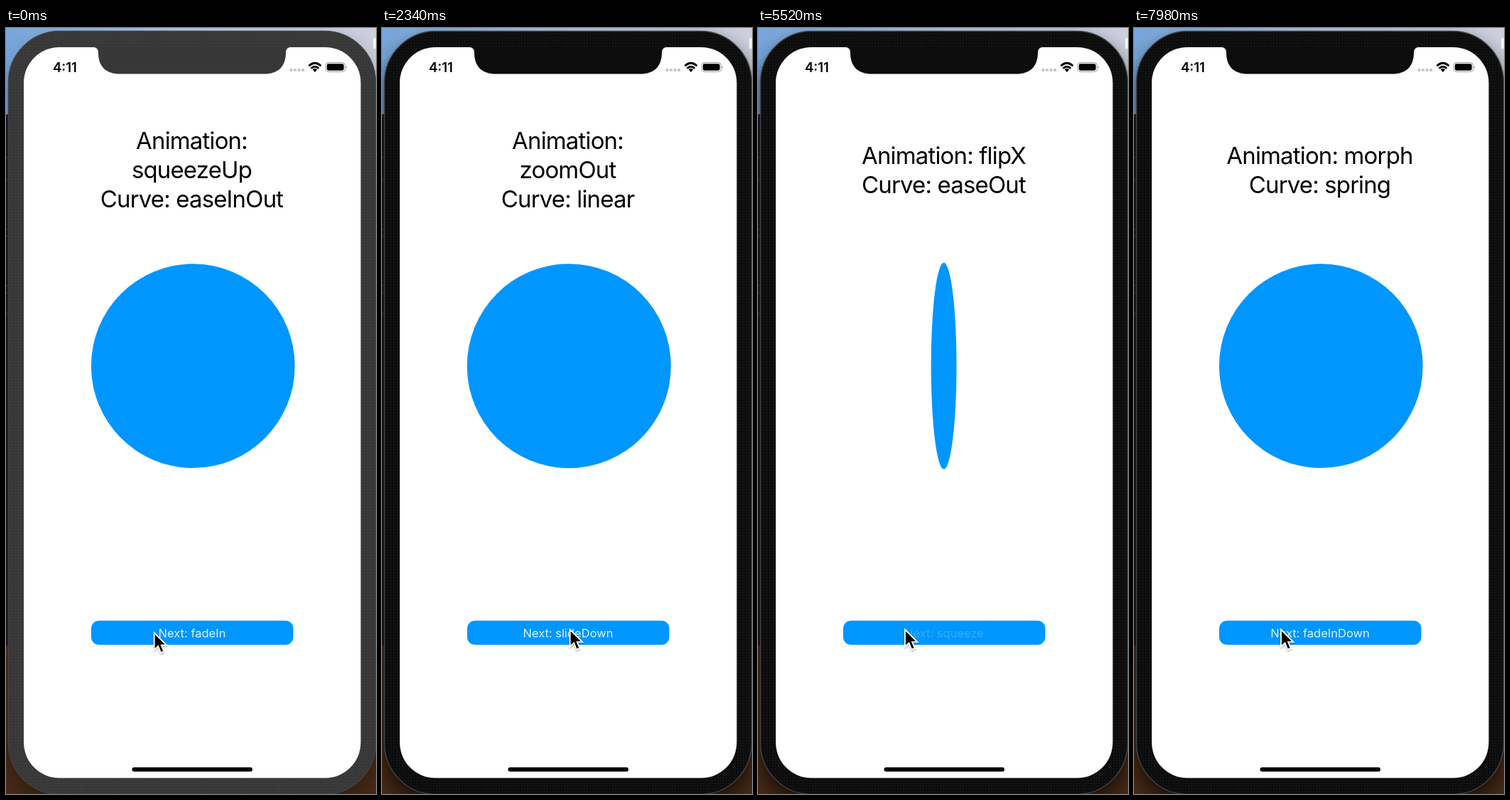
Animation of 521x1076 px, one loop 8 s. Source, as an HTML page:

```html
<!DOCTYPE html>
<html lang="en">
<head>
<meta charset="utf-8">
<title>Animation demo</title>
<style>
  html, body { margin: 0; width: 100%; height: 100%; overflow: hidden; background: #111; }
  svg { display: block; width: 521px; height: 1076px; }
  text { font-family: Inter, Roboto, sans-serif; font-optical-sizing: none; }
  #title { font-size: 33px; letter-spacing: -.85px; text-anchor: middle; }
  #label { font-size: 16.5px; fill: #fff; text-anchor: middle; }
</style>
</head>
<body>
<svg viewBox="0 0 521 1076">
  <defs>
    <linearGradient id="sky">
      <stop offset="0" stop-color="#76a5da"/>
      <stop offset=".45" stop-color="#b0c5e2"/>
      <stop offset="1" stop-color="#cdcfdb"/>
    </linearGradient>
    <linearGradient id="ground" x2="0" y2="1">
      <stop offset="0" stop-color="#4f2e1b"/>
      <stop offset="1" stop-color="#482916"/>
    </linearGradient>
    <pattern id="grain" width="4" height="4" patternUnits="userSpaceOnUse">
      <rect width="2" height="2" fill="#fff" opacity=".04"/>
    </pattern>
    <clipPath id="screen"><rect x="25" y="27" width="474.500" height="1026.500" rx="50"/></clipPath>
    <filter id="blur" x="-20%" y="-20%" width="140%" height="140%"><feGaussianBlur stdDeviation="14"/></filter>
    <filter id="shadow" x="-50%" y="-50%" width="200%" height="200%">
      <feDropShadow dx="0" dy="1.500" stdDeviation="1.200" flood-opacity=".35"/>
    </filter>
  </defs>

  <!-- desktop -->
  <rect width="521" height="122" fill="url(#sky)"/>
  <rect y="121" width="521" height="747" fill="#1b1b1d"/>
  <path d="M0 122H4M0 182H4M0 213H4M0 283H4M0 292H4M0 362H4M0 372H4M0 401H4" stroke="#444" stroke-width="1"/>
  <rect y="867" width="521" height="209" fill="url(#ground)"/>
  <rect x="517" y="14" width="4" height="15" fill="#f4f4f4"/>

  <!-- phone -->
  <rect id="glow" x="3" y="18" width="518" height="1072" rx="72" filter="url(#blur)"/>
  <rect id="bezel" x="3.500" y="4.500" width="517" height="1072" rx="72" stroke="#3f4348" stroke-width="1.500"/>
  <rect x="5" y="6" width="514" height="1069" rx="70" fill="url(#grain)"/>
  <rect x="25" y="27" width="474.500" height="1026.500" rx="50" fill="#fff"/>

  <g clip-path="url(#screen)">
    <g id="title"></g>
    <ellipse id="ball" fill="#0096ff"/>
    <rect x="120" y="832.500" width="284.500" height="34" rx="11" fill="#0096ff"/>
    <text id="label" x="262" y="856"></text>
    <rect x="177.500" y="1038.500" width="169.500" height="6" rx="3"/>
  </g>
  <path id="notch" d="M121 26.500C127 27 130 29 130 35C130 54 141 64.500 160 64.500H364C383 64.500 394 54 394 35C394 29 397 27 403 26.500Z"/>

  <!-- status bar -->
  <text x="66" y="61.500" font-size="18.500" font-weight="600">4:11</text>
  <g fill="#c8c8c8">
    <circle cx="401.500" cy="59" r="2.200"/><circle cx="407" cy="59" r="2.200"/>
    <circle cx="412.500" cy="59" r="2.200"/><circle cx="418" cy="59" r="2.200"/>
  </g>
  <g fill="none" stroke="#000" stroke-width="2.800">
    <path d="M426.500 53.300Q435 45.300 443.500 53.300"/>
    <path d="M429.700 56.700Q435 51.700 440.300 56.700"/>
  </g>
  <path d="M431.700 58.500Q435 55.700 438.300 58.500L435 62Z"/>
  <rect x="450" y="48.500" width="27.500" height="13" rx="4" fill="none" stroke="#999"/>
  <rect x="451.800" y="50.300" width="23.900" height="9.400" rx="2.400"/>
  <path d="M478.800 53V57.500Q481 55.200 478.800 53Z" fill="#999"/>

  <path id="cursor" d="M0 0V24L5.500 18.900L9.200 28L13.700 26.100L10 17.300H17.300Z"
        stroke="#fff" stroke-width="1.800" filter="url(#shadow)"/>
</svg>
<script>
const LOOP = 8000, STEP = 60, RUN = 700;
const CX = 263.3, CY = 474.7, R = 143.4;

const $ = id => document.getElementById(id);
const clamp = v => Math.min(1, Math.max(0, v));
const mix = (a, b, p) => a + (b - a) * p;
const smooth = p => p * p * (3 - 2 * p);

// Damped spring from 0 to 1, with a slight overshoot.
function spring(ms) {
  const s = ms / 1000;
  return 1 - Math.exp(-9.8 * s) * (Math.cos(10 * s) + .98 * Math.sin(10 * s));
}

// cubic-bezier(0, 0, .58, 1)
function easeOut(x) {
  let lo = 0, hi = 1;
  for (let i = 0; i < 20; i++) {
    const s = (lo + hi) / 2;
    if (1.74 * s * s * (1 - s) + s ** 3 < x) lo = s; else hi = s;
  }
  return smooth(lo);
}

// Values placed a fifth of the run apart; the last one is held.
function keyed(values, ms) {
  const p = Math.min(ms / RUN * 5, values.length - 1);
  const i = Math.min(Math.floor(p), values.length - 2);
  return mix(values[i], values[i + 1], p - i);
}

function flipX(ms) {
  const angle = Math.PI * easeOut(clamp(ms / RUN));
  const depth = Math.sin(angle);
  return { x: -1.7 * depth, sx: Math.abs(Math.cos(angle)), sy: 1 + .012 * depth };
}

const scenes = [
  { at: -2000, lines: ["Animation:", "squeezeUp", "Curve: easeInOut"], next: "fadeIn", pose: () => ({}) },
  { at: 700, lines: ["Animation: fadeIn", "Curve: easeIn"], next: "zoomOut",
    pose: ms => ({ alpha: spring(ms) }) },
  { at: 1621, lines: ["Animation:", "zoomOut", "Curve: linear"], next: "slideDown",
    pose: ms => { const p = spring(ms); return { sx: 2 - p, sy: 2 - p, alpha: p }; } },
  { at: 2740, lines: ["Animation:", "slideDown", "Curve: spring"], next: "slideRight",
    pose: ms => ({ y: 300 * (spring(ms) - 1) }) },
  { at: 3590, lines: ["Animation:", "slideRight", "Curve: easeOut"], next: "flipX",
    pose: ms => ({ x: 300 * (spring(ms) - 1) }) },
  { at: 5302, lines: ["Animation: flipX", "Curve: easeOut"], next: "squeeze", dim: .2, pose: flipX },
  { at: 6580, lines: ["Animation:", "squeeze", "Curve: linear"], next: "morph",
    pose: ms => ({ sx: keyed([1, 1.5, .5, 1.5, 1], ms), sy: keyed([1, .5, 1, .5, 1], ms) }) },
  { at: 7240, lines: ["Animation: morph", "Curve: spring"], next: "fadeInDown",
    pose: ms => ({ sx: keyed([1, 1.3, .7, 1.3, 1], ms), sy: keyed([1, .7, 1.3, .7, 1], ms) }) }
];

const cursorStops = [[250, 208.7, 849.5], [650, 264.7, 845], [4400, 264.7, 845], [5000, 207, 845]];

function cursorAt(t) {
  if (t <= cursorStops[0][0]) return cursorStops[0].slice(1);
  for (let i = 1; i < cursorStops.length; i++) {
    const [t0, x0, y0] = cursorStops[i - 1], [t1, x1, y1] = cursorStops[i];
    if (t < t1) {
      const p = smooth((t - t0) / (t1 - t0));
      return [mix(x0, x1, p), mix(y0, y1, p)];
    }
  }
  return cursorStops.at(-1).slice(1);
}

function setTitle(lines) {
  const top = lines.length === 3 ? 170 : 190.7;
  $("title").innerHTML = lines
    .map((line, i) => `<text x="261.500" y="${top + i * 40.8}">${line}</text>`).join("");
}

function setLabel(index, ms) {
  const { next, dim = .88 } = scenes[index];
  const pressed = ms < 150 && index > 0;
  $("label").textContent = "Next: " + (pressed ? scenes[index - 1].next : next);
  $("label").setAttribute("opacity", pressed ? .35 : Math.min(dim, Math.max(.12, .4 + (ms - 260) * .003)));
}

// The window darkens and casts a deeper shadow once it has focus.
function setFocus(focused) {
  const shade = focused ? "#0c0c0c" : "#373737";
  $("bezel").setAttribute("fill", shade);
  $("notch").setAttribute("fill", shade);
  $("glow").setAttribute("opacity", focused ? .65 : .3);
}

let shown = -1;

function draw(t) {
  const index = scenes.findLastIndex(s => s.at <= t);
  const scene = scenes[index], ms = t - scene.at;
  if (index !== shown) setTitle(scene.lines);
  shown = index;
  setLabel(index, ms);

  const { x = 0, y = 0, sx = 1, sy = 1, alpha = 1 } = scene.pose(ms);
  const ball = { cx: CX + x, cy: CY + y, rx: R * sx, ry: R * sy, opacity: clamp(alpha) };
  for (const key in ball) $("ball").setAttribute(key, ball[key]);

  setFocus(t >= 300);
  $("cursor").setAttribute("transform", `translate(${cursorAt(t)})`);
}

const start = performance.now();
function tick() {
  const t = (performance.now() - start) % LOOP;
  draw(Math.floor(t / STEP) * STEP);
  requestAnimationFrame(tick);
}
tick();
</script>
</body>
</html>
```
